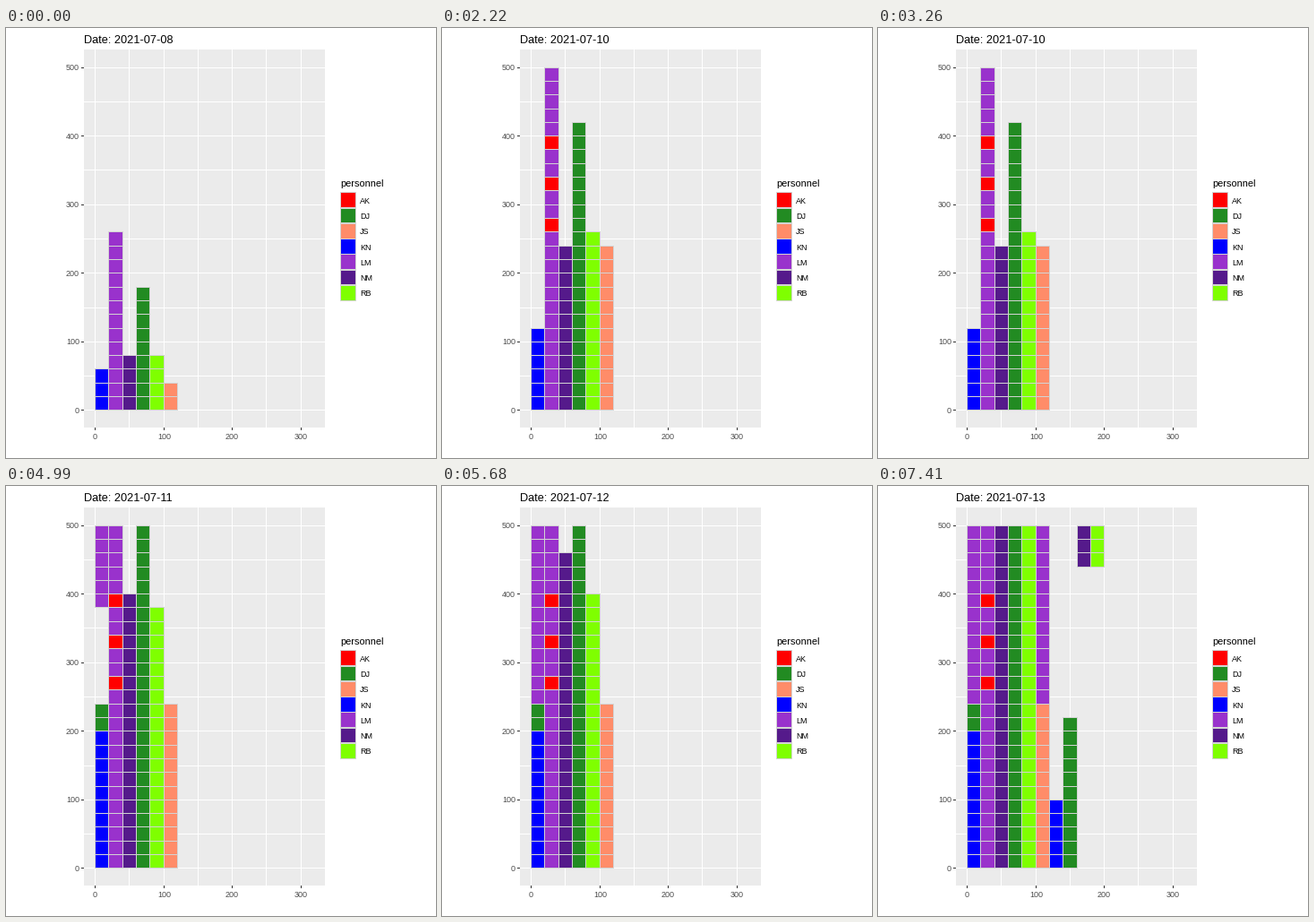
A matplotlib script that plays this animation: 480x480 px, repeating every 8000 ms.

```python
import matplotlib.pyplot as plt
from matplotlib.animation import FuncAnimation
from matplotlib.collections import LineCollection, PolyCollection
from matplotlib.patches import Rectangle

plt.rcParams["font.family"] = "Liberation Sans"

SIZE, DPI = 480, 72  # at 72 dpi one point is one pixel
STEP, LOOP = 20, 8000  # ms
SCALE, X0, Y0 = 0.7655, 99.6, 426.87
LEFT, RIGHT, TOP, BOTTOM = 87, 356, 24, 446
CELL = 20
EDGE = "#d3d3d3"

COLORS = {
    "AK": "#ff0000", "DJ": "#228b22", "JS": "#ff8c69", "KN": "#0000ff",
    "LM": "#9932cc", "NM": "#551a8b", "RB": "#7fff00",
}

# Per day: start time, then (column, first cell, end cell, person) added that day
DAYS = [
    (0, [(0, 0, 3, "KN"), (1, 0, 13, "LM"), (2, 0, 4, "NM"),
         (3, 0, 9, "DJ"), (4, 0, 4, "RB"), (5, 0, 2, "JS")]),
    (500, [(4, 4, 5, "RB")]),
    (2220, [(0, 3, 6, "KN"), (1, 13, 25, "LM"), (1, 13, 14, "AK"),
            (1, 16, 17, "AK"), (1, 19, 20, "AK"), (2, 4, 12, "NM"),
            (3, 9, 21, "DJ"), (4, 5, 13, "RB"), (5, 2, 12, "JS")]),
    (3950, [(0, 6, 10, "KN"), (0, 10, 12, "DJ"), (0, 19, 25, "LM"),
            (2, 12, 20, "NM"), (3, 21, 25, "DJ"), (4, 13, 19, "RB")]),
    (5680, [(0, 12, 19, "LM"), (2, 20, 23, "NM"), (4, 19, 20, "RB")]),
    (7410, [(2, 23, 25, "NM"), (4, 20, 25, "RB"), (5, 12, 25, "LM"),
            (6, 0, 5, "KN"), (7, 0, 11, "DJ"), (8, 22, 25, "NM"),
            (9, 22, 25, "RB")]),
]


def mid(value):
    """Centre of the pixel that holds a coordinate."""
    return int(value) + 0.5


def px(value):
    return mid(X0 + value * SCALE)


def py(value):
    return mid(Y0 - value * SCALE)


def box(x1, y1, x2, y2):
    return [(x1, y1), (x2, y1), (x2, y2), (x1, y2)]


def cell_box(column, row):
    x, y = column * CELL, row * CELL
    return box(px(x), py(y), px(x + CELL), py(y + CELL))


def stacks_by_day():
    """Cells present on each day, as {(column, row): person}."""
    cells, result = {}, []
    for _, added in DAYS:
        for column, first, end, person in added:
            cells.update({(column, row): person for row in range(first, end)})
        result.append(dict(cells))
    return result


fig = plt.figure(figsize=(SIZE / DPI, SIZE / DPI), dpi=DPI, facecolor="white")
ax = fig.add_axes([0, 0, 1, 1])
ax.set(xlim=(0, SIZE), ylim=(SIZE, 0))
ax.axis("off")


def fill(x, y, width, height, color):
    ax.add_patch(Rectangle((x, y), width, height, fc=color, lw=0, zorder=0))


def lines(segments, color):
    ax.add_collection(LineCollection(segments, colors=color, linewidths=1,
                                     capstyle="butt", snap=False, zorder=1),
                      autolim=False)


def label(x, y, text, size, color="black", ha="left"):
    return ax.text(x, y, text, fontsize=size, color=color, ha=ha,
                   va="baseline")


def tiles(boxes=(), colors="none"):
    collection = PolyCollection(boxes, facecolors=colors, edgecolors=EDGE,
                                linewidths=1, snap=False, zorder=2)
    ax.add_collection(collection, autolim=False)
    return collection


# Panel, grid and axes
fill(LEFT, TOP, RIGHT - LEFT, BOTTOM - TOP, "#ebebeb")
lines([[(px(v), TOP), (px(v), BOTTOM)] for v in range(0, 301, 50)]
      + [[(LEFT, py(v)), (RIGHT, py(v))] for v in range(0, 501, 50)], "white")
lines([[(px(v), BOTTOM), (px(v), BOTTOM + 3)] for v in range(0, 301, 100)]
      + [[(LEFT - 3, py(v)), (LEFT, py(v))] for v in range(0, 501, 100)],
      "#333333")
for v in range(0, 301, 100):
    label(px(v), 459, str(v), 9, "#4d4d4d", "center")
for v in range(0, 501, 100):
    label(82, round(Y0 - v * SCALE + 3), str(v), 9, "#4d4d4d", "right")

# Legend
KEY, KEY_X, KEY_Y, INSET = 17.28, 373, 183.5, 0.3
label(KEY_X, 177, "personnel", 11)
fill(KEY_X, 183, 17, 121, "#f2f2f2")
keys = []
for i, person in enumerate(COLORS):
    y = KEY_Y + i * KEY
    keys.append(box(mid(KEY_X + INSET), mid(y + INSET),
                    mid(KEY_X + KEY + INSET), mid(y + KEY - INSET)))
    label(395, round(y + KEY / 2 + 3.6), person, 9)
tiles(keys, list(COLORS.values()))

title = label(LEFT, 17, "", 12.8)
bars = tiles()
stacks = stacks_by_day()


def update(frame):
    time = (frame + 0.5) * STEP
    day = sum(time >= start for start, _ in DAYS) - 1
    title.set_text(f"Date: 2021-07-{8 + day:02d}")
    bars.set_verts([cell_box(*cell) for cell in stacks[day]])
    bars.set_facecolor([COLORS[person] for person in stacks[day].values()])
    return title, bars


anim = FuncAnimation(fig, update, frames=LOOP // STEP, interval=STEP,
                     repeat=True, repeat_delay=0)
plt.show()
```
